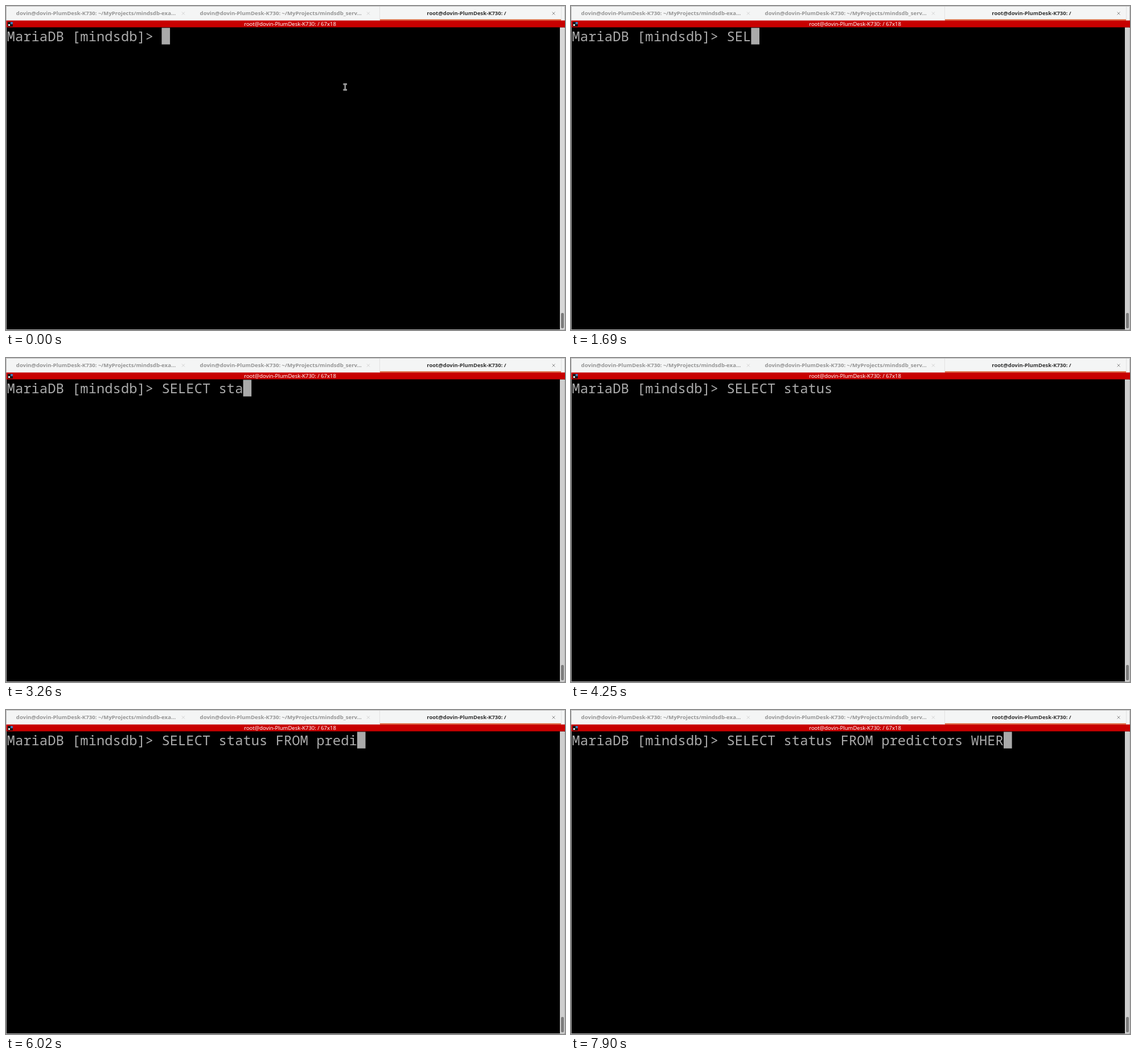
Recreate the animation shown at these times as an HTML page. Size 982 px wide and 570 px high, loop 8 s.

```html
<!DOCTYPE html>
<html lang="en">
<head>
<meta charset="utf-8">
<title>Terminal</title>
<style>
  html, body { margin: 0; width: 100%; height: 100%; overflow: hidden; background: #000; }
  svg { display: block; }
  .ui { font: 9.45px "Noto Sans", "Open Sans", sans-serif; text-anchor: middle; }
  .tab { font-size: 9.6px; font-weight: 700; fill: #949494; }
  .active { font-size: 9.45px; fill: #303030; }
  .term { font: 23.85px "Noto Sans Mono", "DejaVu Sans Mono", monospace; fill: #aaa; white-space: pre; }
  .close { fill: none; stroke: #d2d2d2; stroke-width: 1; }
</style>
</head>
<body>
<svg width="982" height="570" viewBox="0 0 982 570">
  <rect width="982" height="570" fill="#000"/>

  <!-- tab bar -->
  <rect width="982" height="26" fill="#f4f5f5"/>
  <path d="M656.5 1V25M975.5 1V25" stroke="#e2e2e2"/>
  <rect x="657" y="23.5" width="318" height="2" fill="#dc5a2b"/>
  <g class="ui tab">
    <text x="158" y="16.3">dovin@dovin-PlumDesk-K730: ~/MyProjects/mindsdb-exa...</text>
    <text x="482.7" y="16.3">dovin@dovin-PlumDesk-K730: ~/MyProjects/mindsdb_serv...</text>
    <text class="active" x="809" y="16.3">root@dovin-PlumDesk-K730: /</text>
  </g>
  <path class="close" d="M309 10.5l5 5m0-5l-5 5M634 10.5l5 5m0-5l-5 5"/>
  <path class="close" style="stroke:#8c8c8c" d="M959.5 10.5l5 5m0-5l-5 5"/>

  <!-- scrollbar and window edge -->
  <rect id="track" x="973" y="37.5" width="8" height="532.5"/>
  <rect x="975" y="540" width="5" height="27" rx="2" fill="#7c7c7c"/>
  <path d="M.5 570V.5H981.5V26M.5 569.5H981.5V38" fill="none" stroke="#b9b9b9"/>

  <!-- title bar -->
  <rect x=".5" y="25.5" width="981.5" height="12" fill="#c80000"/>
  <rect x="3" y="28" width="9" height="8" fill="#181818"/>
  <rect x="8" y="28" width="4" height="4" fill="#3f78b5"/>
  <rect x="4" y="32" width="3" height="3" fill="#e8e8e8"/>
  <text class="ui" x="499" y="35.3" fill="#fff">root@dovin-PlumDesk-K730: / 67x18</text>

  <text id="line" class="term" x="1.6" y="62" xml:space="preserve"></text>
  <rect id="cursor" y="38.4" width="14.6" height="29.2" fill="#aaa"/>

  <g id="pointer" fill="none">
    <path d="M592.5 137.5h2.2l1 1 1-1h2.2M595.7 138.5v8M592.5 147.5h2.2l1-1 1 1h2.2" stroke="#ededed" stroke-width="2.4"/>
    <path d="M593 137.5h1.7l1 1 1-1h1.7M595.7 138.5v8M593 147.5h1.7l1-1 1 1h1.7" stroke="#161616" stroke-width=".8"/>
  </g>
</svg>
<script>
const LOOP = 8000, CELL = 14.31, LEFT = 1.6;
const PROMPT = 'MariaDB [mindsdb]> ';
const QUERY = 'SELECT status FROM predictors WHER';

// One time per typed character.
const KEY_TIMES = [
  1200, 1500, 1690, 1800, 1980, 2380, 2680,
  2880, 3030, 3190, 3340, 3500, 3650, 4350,
  4510, 4680, 4840, 5140, 5230,
  5530, 5680, 5830, 5970, 5970, 6120, 6410, 6500, 6600, 6690, 7090,
  7390, 7560, 7730, 7900
];
const CURSOR_OFF = [[310, 900], [4250, 4350]];

const byId = id => document.getElementById(id);
const [line, cursor, pointer, track] = ['line', 'cursor', 'pointer', 'track'].map(byId);
const show = (node, on) => node.setAttribute('visibility', on ? 'visible' : 'hidden');

function draw(t) {
  const typed = KEY_TIMES.filter(time => time <= t).length;
  line.textContent = PROMPT + QUERY.slice(0, typed);
  cursor.setAttribute('x', LEFT + (PROMPT.length + typed) * CELL);
  show(cursor, !CURSOR_OFF.some(([from, to]) => t >= from && t < to));
  show(pointer, typed === 0);
  track.setAttribute('fill', t < 150 ? '#d8d8d8' : '#cecece');
}

const start = performance.now();
function tick() {
  draw((performance.now() - start) % LOOP);
  requestAnimationFrame(tick);
}
tick();
</script>
</body>
</html>
```
